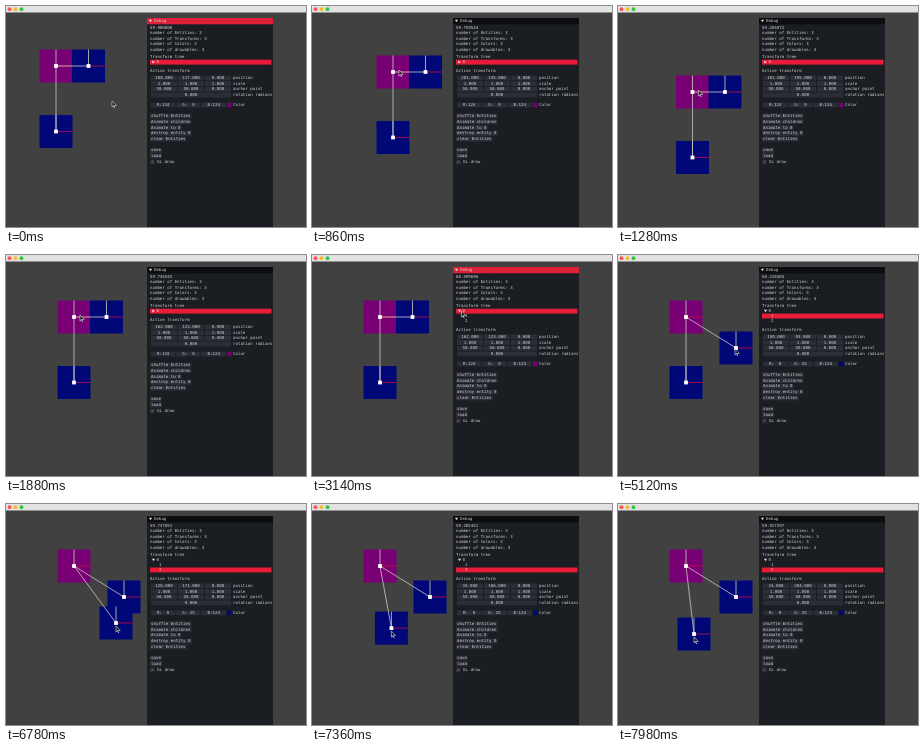
Recreate the animation shown at these times as an HTML page with a canvas. Size 300 px wide and 221 px high, loop 8 s.

```html
<!DOCTYPE html>
<html lang="en">
<head>
<meta charset="utf-8">
<title>Transform debug</title>
<style>
  html, body { margin: 0; width: 100%; height: 100%; overflow: hidden; background: #414141; }
  canvas { display: block; width: 100vw; height: 100vh; }
</style>
</head>
<body>
<canvas></canvas>
<script>
const W = 300, H = 221, LOOP = 8000;
const PANEL = { left: 141, top: 12, width: 126 };
const TEXT_X = 144, SIZE = 33, HALF = SIZE / 2;
const PURPLE = '#780074', NAVY = '#000878', RED = '#e81c36', FIELD = '#2b2e36';

const canvas = document.querySelector('canvas');
const ctx = canvas.getContext('2d');
const dpr = window.devicePixelRatio || 1;
canvas.width = W * dpr;
canvas.height = H * dpr;

const add = (...points) => points.reduce((a, b) => [a[0] + b[0], a[1] + b[1]]);
const mix = (a, b, u) => [a[0] + (b[0] - a[0]) * u, a[1] + (b[1] - a[1]) * u];

function ease(t, start, end) {
  const u = Math.min(1, Math.max(0, (t - start) / (end - start)));
  return u * u * (3 - 2 * u);
}

// Offset gained by one drag; sag bends its path downwards.
function drag(t, start, end, dx, dy, sag = 0) {
  const u = ease(t, start, end);
  return [dx * u, dy * u + sag * Math.sin(Math.PI * u)];
}

function rect(x, y, w, h, color) {
  ctx.fillStyle = color;
  ctx.fillRect(x, y, w, h);
}

function line(a, b, color) {
  ctx.strokeStyle = color;
  ctx.lineWidth = 0.8;
  ctx.beginPath();
  ctx.moveTo(...a);
  ctx.lineTo(...b);
  ctx.stroke();
}

function shape(points, color) {
  ctx.fillStyle = color;
  ctx.beginPath();
  points.forEach(p => ctx.lineTo(...p));
  ctx.closePath();
  ctx.fill();
}

function label(str, x, y, align = 'left') {
  ctx.fillStyle = '#cfcfcf';
  ctx.textAlign = align;
  ctx.fillText(str, x, y);
}

function field(x, y, w, str) {
  rect(x, y - 2.4, w, 4.8, FIELD);
  label(str, x + w / 2, y, 'center');
}

function button(str, y) {
  rect(TEXT_X, y - 2.4, str.length * 2.47 + 2, 4.8, FIELD);
  label(str, TEXT_X + 1, y);
}

function arrow(x, y, open) {
  ctx.save();
  ctx.translate(x + 1.5, y);
  if (open) ctx.rotate(Math.PI / 2);
  shape([[-1.2, -1.5], [1.3, 0], [-1.2, 1.5]], '#e4e4e4');
  ctx.restore();
}

function drawTitleBar() {
  rect(0, 0, W, 6.5, '#e2e2e2');
  ['#f9564f', '#f8b92e', '#2fc543'].forEach((color, i) => {
    ctx.fillStyle = color;
    ctx.beginPath();
    ctx.arc(3.5 + i * 6, 3.2, 1.9, 0, Math.PI * 2);
    ctx.fill();
  });
}

function drawScene(parent, first, second) {
  const nodes = [parent, first, second];
  nodes.forEach(([x, y], i) => rect(x - HALF, y - HALF, SIZE, SIZE, i ? NAVY : PURPLE));
  for (const p of nodes) {
    line(p, add(p, [HALF, 0]), '#c4103c');
    line(p, add(p, [0, -HALF]), '#c9d2bd');
    line(parent, p, '#c8c8c8');
  }
  for (const [x, y] of nodes) rect(x - 1.9, y - 1.9, 3.8, 3.8, '#fff');
}

function drawPanel(t, position, selected, expanded, focused) {
  const { left, top, width } = PANEL;
  rect(left, top, width, H - top, '#1a1d22');
  rect(left, top, width, 6.3, focused ? '#dd2038' : '#0c0d10');
  arrow(143, 15, true);
  label('Debug', 148, 15.2);

  const rate = 59.9 + 0.7 * Math.sin(Math.floor(t / 20) * 0.37);
  label(rate.toFixed(6), TEXT_X, 22);
  ['Entities', 'Transforms', 'Colors', 'drawables'].forEach((name, i) =>
    label(`number of ${name}: 3`, TEXT_X, 27.4 + i * 5.4));

  label('Transform tree', TEXT_X, 51);
  rect(TEXT_X, 53.7 + selected * 4.9, 121.5, 4.9, RED);
  arrow(146, 56, expanded);
  label('0', 150.5, 56.1);
  if (expanded) [1, 2].forEach(n => label(n, 153, 56.1 + n * 4.9));

  ctx.save();
  ctx.translate(0, expanded ? 9.8 : 0);
  label('Active transform', TEXT_X, 65);
  Object.entries({
    'position': [...position, 0],
    'scale': [1, 1, 1],
    'anchor point': [50, 50, 0],
    'rotation radians': [0]
  }).forEach(([name, values], row) => {
    const y = 72 + row * 5.7, step = 81 / values.length;
    values.forEach((v, i) => field(145 + i * step, y, step - 1, v.toFixed(3)));
    label(name, 227, y);
  });

  const colors = selected ? ['R:  0', 'G: 25', 'B:124'] : ['R:124', 'G:  0', 'B:124'];
  colors.forEach((v, i) => field(145 + i * 25.3, 99, 24.3, v));
  rect(221, 96.7, 4.5, 4.6, selected ? NAVY : PURPLE);
  label('Color', 227, 99);

  ['shuffle Entities', 'Animate children', 'Animate to 0', 'destroy entity 0', 'clear Entities']
    .forEach((str, i) => button(str, 110 + i * 5.8));
  ['save', 'load'].forEach((str, i) => button(str, 144.4 + i * 5.8));
  field(TEXT_X, 156.2, 4.8, '✓');
  label('GL draw', 151, 156.3);
  ctx.restore();
}

function drawPointer([x, y]) {
  ctx.save();
  ctx.translate(x, y);
  shape([[-1, -3], [-1, 3], [0.7, 1.6], [3.2, 1.4]], '#111');
  ctx.strokeStyle = '#e6e6e6';
  ctx.lineWidth = 0.6;
  ctx.stroke();
  line([0.5, 1.5], [1.7, 4], '#e6e6e6');
  ctx.restore();
}

// Each approach keeps following its goal, so the pointer stays on what it drags.
function pointerAt(t, parent, first, second) {
  const row = n => [155, 57 + n * 4.9];
  const approach = (p, goal, start, end) => mix(p, goal, ease(t, start, end));
  let p = approach([107, 98], add(parent, [7, 1]), 0, 290);
  p = approach(p, add(row(0), [-8, 0]), 2450, 2850);
  p = approach(p, row(1), 3050, 3250);
  p = approach(p, add(first, [0, 4]), 3400, 3850);
  p = approach(p, row(2), 5720, 6030);
  return approach(p, add(second, [1, 6]), 6150, 6490);
}

function draw(t) {
  ctx.setTransform(canvas.width / W, 0, 0, canvas.height / H, 0, 0);
  ctx.font = '4.1px "DejaVu Sans Mono", monospace';
  ctx.textBaseline = 'middle';
  rect(0, 0, W, H, '#414141');
  drawTitleBar();

  const parent = add([50, 60], drag(t, 300, 860, 31, 6, 40), drag(t, 860, 1700, -13, -4, 22));
  const firstLocal = add([32.5, 0], drag(t, 3850, 4300, 9.5, 28),
    drag(t, 4300, 5120, 8, 3), drag(t, 5120, 5680, 0, 0, 26));
  const secondLocal = add([0, 65.5], drag(t, 6500, 6780, 42, -8.5),
    drag(t, 6780, 7600, -38.5, 11, -6), drag(t, 7600, 7980, 4.5, 0));
  const first = add(parent, firstLocal), second = add(parent, secondLocal);
  drawScene(parent, first, second);

  const selected = t < 3300 ? 0 : t < 6080 ? 1 : 2;
  const locals = [add(parent, [-14, -21]), firstLocal, secondLocal];
  const position = locals[selected].map(v => Math.round(v * 3));
  const within = (start, end) => t >= start && t < end;
  const focused = within(0, 300) || within(2950, 3850) || within(6080, 6500);
  drawPanel(t, position, selected, t >= 2950, focused);
  drawPointer(pointerAt(t, parent, first, second));
}

function frame() {
  draw(performance.now() % LOOP);
  requestAnimationFrame(frame);
}
frame();
</script>
</body>
</html>
```
